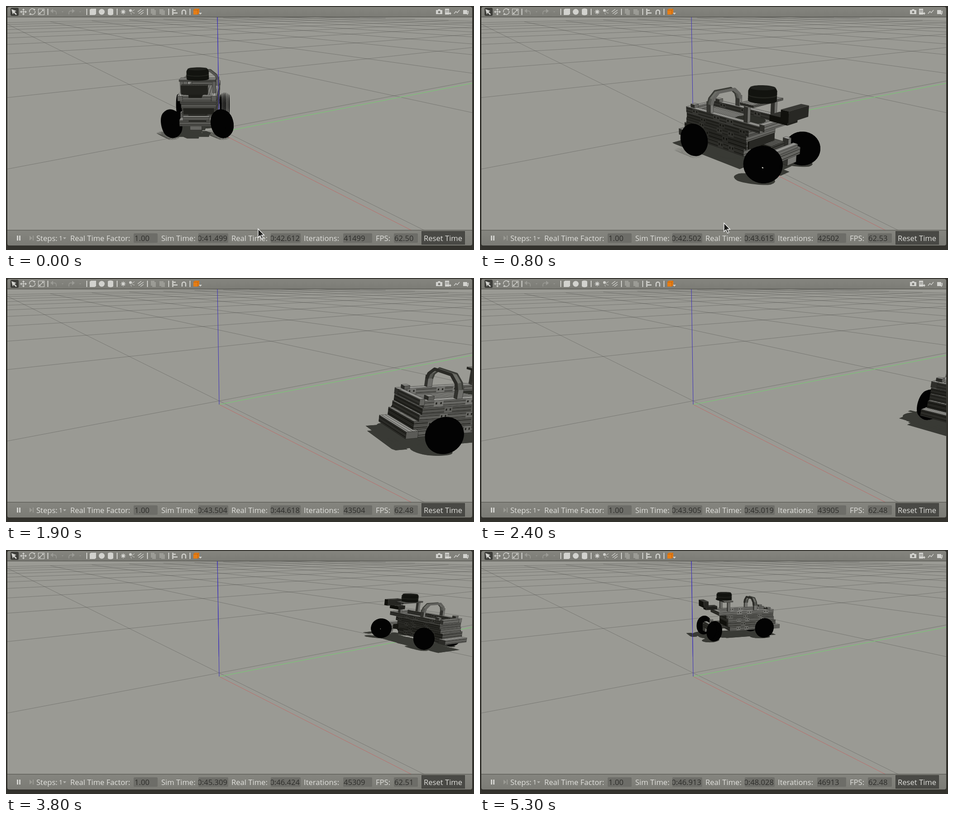
Write an HTML page with a canvas that moves like this. It is 1034 px wide and 542 px high and loops after 5400 ms.

```html
<!DOCTYPE html>
<html lang="en">
<head>
<meta charset="utf-8">
<title>Robot simulation</title>
<style>
html, body { margin: 0; width: 100%; height: 100%; overflow: hidden; background: #33322d; }
canvas { position: absolute; left: 3px; top: 24px; }
svg.ui { position: absolute; left: 0; top: 0; }
text { font: 16.6px "Open Sans", "Noto Sans", sans-serif; fill: #e0e0dc; }
.value { fill: #2d2d2a; }
.field { fill: #6d6d68; }
.icon { fill: none; stroke: #d2d2ce; stroke-width: 1.4; }
.solid { fill: #d2d2ce; }
.dim { opacity: .32; }
</style>
</head>
<body>
<canvas id="view" width="1027" height="474"></canvas>
<svg class="ui" width="1034" height="542">
  <defs>
    <linearGradient id="bar" x2="0" y2="1"><stop stop-color="#85857f"/><stop offset="1" stop-color="#7b7b75"/></linearGradient>
  </defs>
  <path d="M3 24V6q0-4 4-4H1026q4 0 4 4V24z" fill="url(#bar)"/>
  <path d="M3 498H1030V528q0 4-4 4H7q-4 0-4-4z" fill="url(#bar)"/>
  <path d="M3 24.500H1030M3 498H1030" stroke="#484843"/>
  <path d="M92.500 6V20M178.500 6V20M245.500 6V20M312.500 6V20M359.500 6V20M406.500 6V20" stroke="#ecece8" stroke-width="1.500"/>

  <rect x="10" y="4" width="18" height="18" rx="3" fill="#3d3d39"/>
  <path class="solid" d="M12 7l11 4-4 2 5 5-2 2-5-5-2 4z"/>
  <g class="icon">
    <path d="M33 13H44M38.500 7.500V18.500"/>
    <path d="M52 14a6 6 0 0 1 10-6M64 11a6 6 0 0 1-10 6"/>
    <path d="M71.500 6.500H84.500V19.500H71.500zM74 17L82 9" stroke-width="1.200"/>
    <path d="M253 13h12M259 7v12M255 9l8 8M263 9l-8 8" stroke-width="1.100"/>
    <path d="M278 12l6-4M279 14l5 2M276 15l1 4" stroke-width="1.300" stroke-dasharray="2 1"/>
    <path d="M291 13l8-6M293 17l11-8M297 19l7-5"/>
    <path d="M368.500 6V20M370 9.500h5M370 15.500h9" stroke-width="2.600"/>
    <path d="M389 19v-6a4 4 0 0 1 8 0v6" stroke-width="2.400"/>
    <path d="M990 17l4-5 3 3 5-6"/>
  </g>
  <path class="solid" d="M38.500 5.500l3 3.500h-6zM38.500 20.500l3-3.500h-6zM31 13l3.500-3v6zM46 13l-3.500-3v6zM61 6l4 1-3 4zM55 20l-4-1 3-4zM79 8h4v4zM73 14v4h4z"/>
  <g class="dim">
    <path class="icon" d="M101 11h7q4 1 3 8M149 11h-7q-4 1-3 8" stroke-width="2"/>
    <path class="solid" d="M98 11l6-5v10zM152 11l-6-5v10zM123 12h4l-2 2zM162 12h4l-2 2zM320 6h8v11h-8zM323 9h8v11h-8zM339 7h9v11h-9zM343 10h8v10h-8z"/>
  </g>
  <path class="solid" d="M185 8l3-2h11v12l-3 2h-11zM225 8a6 2.500 0 0 1 12 0v10a6 2.500 0 0 1-12 0z"/>
  <g class="solid"><circle cx="211.500" cy="13" r="6.500"/><circle cx="259" cy="13" r="3.200"/><circle cx="275" cy="10" r="3"/></g>
  <path d="M414 9l3-3h10v10l-3 3h-10z" fill="#e57d16"/>
  <path d="M414 9h10v10M424 9l3-3" stroke="#b95f0b" fill="none"/>
  <path class="solid" d="M426 15h7l-3.500 4zM950 9h4l1-2h4l1 2h4v9h-14zM970 6h9v13h-9zM1010 9h9v9h-9zM1019 13l3-3v7z"/>
  <circle cx="957" cy="13.500" r="2.500" fill="#777772"/>
  <path d="M971 10h7M971 13h7" stroke="#6d6d68"/>
  <path class="solid" d="M976 15h5v-2l3 3.500-3 3.500v-2h-5zM1017 16h5l-2.500 4z"/>

  <path class="solid" d="M24 510h3v11h-3zM29 510h3v11h-3z"/>
  <path class="solid dim" d="M52 510l6 5.500-6 5.500zM59 510h2v11h-2z"/>
  <path class="solid" d="M126 514h7l-3.500 4z" opacity=".7"/>
  <g class="field">
    <rect x="282" y="505" width="53" height="21" rx="2"/><rect x="425" y="505" width="66" height="21" rx="2"/>
    <rect x="585" y="505" width="66" height="21" rx="2"/><rect x="745" y="505" width="64" height="21" rx="2"/>
    <rect x="857" y="505" width="53" height="21" rx="2"/>
  </g>
  <rect x="918.500" y="500.500" width="95" height="29" fill="#494945" stroke="#40403c"/>
  <text x="67" y="522">Steps:</text><svg x="118" y="500" width="6" height="30"><text x="-1" y="21" style="font-size:14px">1</text></svg>
  <text x="142" y="522">Real Time Factor:</text><text class="value" x="284" y="522">1.00</text>
  <text x="343" y="522">Sim Time:</text>
  <svg x="425" y="500" width="66" height="30"><text class="value" id="sim" x="64" y="22" text-anchor="end"></text></svg>
  <text x="498" y="522">Real Time:</text>
  <svg x="585" y="500" width="66" height="30"><text class="value" id="real" x="64" y="22" text-anchor="end"></text></svg>
  <text x="658" y="522">Iterations:</text><text class="value" id="steps" x="746" y="522"></text>
  <text x="817" y="522">FPS:</text><text class="value" id="fps" x="858" y="522"></text>
  <text x="923" y="522">Reset Time</text>
  <path id="cursor" d="M0 0V19L4.500 15L8 22.500L11 21L7.500 14H13.500z" fill="#1c1c1a" stroke="#fff" stroke-width="1.300"/>
</svg>
<script>
const $ = id => document.getElementById(id);
const ctx = $('view').getContext('2d');
const RAD = Math.PI / 180, LOOP = 5400, FOCAL = 889;
const EYE = .454, GRID_Z = .014, PITCH = Math.atan(267 / FOCAL);
const S = Math.sin(PITCH), C = Math.cos(PITCH);
const SLANT = [.42, -.38];                 // shadow shift per unit of height
const SUN = [-.365, .33, .868];
const STEER = -38 * RAD;

// Ground coordinates: [forward from the camera, right, up].
const depth = p => p[0] * C + (EYE - p[2]) * S;
const project = p => {
  const k = FOCAL / depth(p);
  return [517 + k * p[1], 261 + k * ((EYE - p[2]) * C - p[0] * S)];
};
const mix = (a, b, k) => a.map((v, i) => v + (b[i] - v) * k);
const lerp = (xs, ys, x) => {
  let i = 0;
  while (i < xs.length - 2 && x >= xs[i + 1]) i++;
  return ys[i] + (ys[i + 1] - ys[i]) * (x - xs[i]) / (xs[i + 1] - xs[i]);
};

function trace(points) {
  ctx.beginPath();
  points.forEach(p => ctx.lineTo(...project(p)));
}
function fill(points, color) {
  trace(points);
  ctx.closePath();
  ctx.fillStyle = color;
  ctx.fill();
}
function line(points, color, width = 1) {
  trace(points);
  ctx.strokeStyle = color;
  ctx.lineWidth = width;
  ctx.stroke();
}
function ray(a, b, color, width) {
  const near = .05, da = depth(a), db = depth(b);
  if (da < near && db < near) return;
  if (da < near) a = mix(a, b, (near - da) / (db - da));
  if (db < near) b = mix(b, a, (near - db) / (da - db));
  line([a, b], color, width);
}

const YAW = 33.2 * RAD;
const onFloor = (x, y, z) => [
  1.3963 - x * Math.cos(YAW) + y * Math.sin(YAW),
  -.0758 + x * Math.sin(YAW) + y * Math.cos(YAW), z];

function drawFloor() {
  ctx.fillStyle = '#9a9a94';
  ctx.fillRect(0, 0, 1034, 542);
  for (let i = -10; i <= 10; i++) {
    ray(onFloor(i, -10, GRID_Z), onFloor(i, 10, GRID_Z), 'rgba(60,60,56,.45)', .8);
    ray(onFloor(-10, i, GRID_Z), onFloor(10, i, GRID_Z), 'rgba(60,60,56,.45)', .8);
  }
  const o = onFloor(0, 0, 0);
  ray(o, onFloor(10, 0, 0), '#c4605f', .8);
  ray(o, onFloor(0, 10, 0), '#74d070', 1);
  drawMast(0);
}
const drawMast = z => ray(onFloor(0, 0, z), onFloor(0, 0, .6), '#3a2ebb', 1);

// Robot boxes in its own axes: x forward, y right, z up.
const parts = [];
const box = (x0, x1, y0, y1, z0, z1, tone = 1) => parts.push({ lo: [x0, y0, z0], hi: [x1, y1, z1], tone });
const wide = (x0, x1, half, z0, z1, tone) => box(x0, x1, -half, half, z0, z1, tone);
const pair = (x0, x1, y0, y1, z0, z1, tone) => {
  box(x0, x1, y0, y1, z0, z1, tone);
  box(x0, x1, -y1, -y0, z0, z1, tone);
};
wide(-.235, -.2, .068, .04, .06);
wide(-.2, .045, .062, .04, .062);
wide(-.212, .055, .062, .062, .085, .85);
wide(.055, .06, .056, .063, .104, .4);
wide(-.2, .055, .064, .085, .104);
wide(.045, .115, .03, .05, .08, .6);
wide(.115, .15, .058, .045, .066);
pair(.1, .118, .044, .058, .036, .085, 1.1);
wide(.135, .15, .045, .066, .078, 1.1);
wide(.15, .165, .02, .036, .076, 1.2);
wide(-.195, .065, .066, .104, .122, .9);
wide(-.19, .1, .052, .122, .128, .85);
pair(-.195, .106, .05, .068, .124, .142, 1.1);
wide(.09, .106, .05, .124, .142, 1.1);
wide(-.195, -.18, .05, .124, .142, 1.1);
pair(-.18, -.163, .045, .062, .142, .152);
pair(-.1, -.084, .056, .068, .142, .175, 1.2);
pair(.045, .058, .052, .064, .142, .186, 1.1);
wide(.1, .16, .022, .148, .166, .35);
wide(.153, .178, .044, .163, .194, .4);
wide(.03, .078, .064, .188, .194, .9);

const wheels = [-1, 1].flatMap(side => [-.137, .137].map(x => ({ x, side })));
const circle = Array.from({ length: 36 }, (_, i) => [Math.cos(i * 10 * RAD), Math.sin(i * 10 * RAD)]);
const tire = [-.019, -.016, -.011, -.005, 0, .005, .011, .016, .019];
const grey = g => `rgb(${g | 0},${g | 0},${(g - 4) | 0})`;

function drawRobot(phi) {
  const cF = 1.615 + .577 * Math.cos(phi), cR = .41 + .577 * Math.sin(phi);
  const theta = phi - 76.4 * RAD, hx = Math.cos(theta), hy = Math.sin(theta);
  const turn = (x, y) => [x * hx - y * hy, x * hy + y * hx];
  const place = ([x, y, z]) => {
    const [f, r] = turn(x, y);
    return [cF + f, cR + r, z];
  };
  const eye = [-cF * hx - cR * hy, cF * hy - cR * hx, EYE];
  const shade = (p, z = 0) => [p[0] + SLANT[0] * (p[2] - z), p[1] + SLANT[1] * (p[2] - z), z];
  const dist = p => Math.hypot(...p.map((v, i) => v - eye[i]));
  const middle = b => mix(b.lo, b.hi, .5);
  const light = ([x, y, z]) => {
    const lit = [...turn(x, y), z].reduce((s, v, i) => s + v * SUN[i], 0);
    return 42 + 118 * Math.max(0, lit);
  };

  const faces = b => [0, 1, 2].flatMap(axis => [0, 1].map(end => {
    const [u, v] = [0, 1, 2].filter(i => i !== axis);
    const corner = (a, c) => {
      const p = [];
      p[axis] = end ? b.hi[axis] : b.lo[axis];
      p[u] = a ? b.hi[u] : b.lo[u];
      p[v] = c ? b.hi[v] : b.lo[v];
      return p;
    };
    return { axis, end, quad: [corner(0, 0), corner(1, 0), corner(1, 1), corner(0, 1)] };
  }));

  // Part of a quad, in fractions along its two edges.
  const patch = ([a, b, c, d], u0, u1, v0, v1) => {
    const at = (u, v) => mix(mix(a, b, u), mix(d, c, u), v);
    return [at(u0, v0), at(u1, v0), at(u1, v1), at(u0, v1)];
  };

  function drawBox(b) {
    for (const { axis, end, quad } of faces(b)) {
      if (end ? eye[axis] < b.hi[axis] : eye[axis] > b.lo[axis]) continue;
      const normal = [0, 0, 0];
      normal[axis] = end ? 1 : -1;
      const g = light(normal) * b.tone;
      const q = quad.map(place), px = FOCAL / depth(q[0]);
      fill(q, grey(g));
      if (b.tone < .5) continue;
      line([...q, q[0]], 'rgba(25,25,22,.5)', .0012 * px);
      const size = b.hi.map((v, i) => i === axis ? 0 : v - b.lo[i]);
      const length = Math.max(...size);
      if (length < .05) continue;
      const first = [0, 1, 2].find(i => i !== axis) === size.indexOf(length);
      const sheet = first ? q : [q[1], q[2], q[3], q[0]];
      const rows = Math.max(2, Math.round(Math.min(...size.filter(Boolean)) / .01));
      for (let i = 0; i < rows; i++) {
        const v = (i + .5) / rows, h = .12 / rows;
        fill(patch(sheet, 0, 1, v - h, v + h), grey(g * .5));
        fill(patch(sheet, 0, 1, v + h, v + 2 * h), grey(g * 1.2));
      }
      if (axis !== 1 || length < .2) continue;
      // Bolted joining plates.
      for (let i = 0; i < 3; i++) {
        const u = .08 + (i * .31 + b.lo[2] * 17) % .8;
        fill(patch(sheet, u, u + .09, .05, 1), grey(g * 1.15));
        fill(patch(sheet, u + .015, u + .03, .4, .7), grey(g * .35));
        fill(patch(sheet, u + .06, u + .075, .4, .7), grey(g * .35));
      }
    }
  }

  function tireRings({ x, side }) {
    const a = x > 0 ? STEER : 0, ca = Math.cos(a), sa = Math.sin(a);
    return tire.map(o => {
      const r = .051 - 24 * o * o;
      return circle.map(([c, s]) => place([x + r * c * ca - o * sa, side * .088 + r * c * sa + o * ca, .05 + r * s]));
    });
  }
  function drawWheel(w) {
    tireRings(w).forEach(r => fill(r, '#030303'));
    if (w.x < 0) return;
    const n = [-Math.sin(STEER) * w.side, Math.cos(STEER) * w.side];
    const hub = [w.x + n[0] * .02, w.side * .088 + n[1] * .02, .05];
    const facing = (n[0] * (eye[0] - hub[0]) + n[1] * (eye[1] - hub[1])) / dist(hub);
    if (facing < .87) return;
    fill(circle.map(([c, s]) => place([hub[0] + .0025 * c, hub[1], .05 + .0018 * s])), '#c8c8c0');
  }

  const archLine = [[-.062, .165], [-.056, .182], [-.034, .2], [.034, .2], [.056, .182], [.062, .165]];
  const archAt = x => archLine.map(([y, z]) => place([x, y, z]));
  function drawArch() {
    const fromFront = eye[0] > -.09;
    const [far, near] = (fromFront ? [-.1, -.084] : [-.084, -.1]).map(archAt);
    const width = .009 * FOCAL / depth(near[2]);
    ctx.lineJoin = 'round';
    line(far, '#3a3b36', width);
    for (let i = 0; i < 5; i++) fill([far[i], far[i + 1], near[i + 1], near[i]], i % 4 ? '#6c6d67' : '#53544f');
    line(near, grey(light([fromFront ? 1 : -1, 0, 0])), width);
  }

  const lidar = Array.from({ length: 13 }, (_, i) => {
    const z = .194 + i * .003, r = z > .222 ? .04 - (z - .222) * .6 : .04;
    return circle.map(([c, s]) => place([.055 + r * c, r * s, z]));
  });
  const shadow = '#393a35';
  for (const b of parts) for (const f of faces(b)) fill(f.quad.map(p => shade(place(p))), shadow);
  for (const w of wheels) for (const r of tireRings(w)) fill(r.map(p => shade(p)), shadow);
  for (const r of lidar) fill(r.map(p => shade(p)), shadow);

  const byDistance = (a, b) => dist([b.x, b.side * .088, .05]) - dist([a.x, a.side * .088, .05]);
  const order = (a, b) => a.lo[2] - b.lo[2] || dist(middle(b)) - dist(middle(a));
  const isNear = w => w.side * eye[1] > .07;
  const sorted = [...wheels].sort(byDistance), stack = [...parts].sort(order);
  const layers = (from, to) => stack.filter(b => b.lo[2] >= from && b.lo[2] < to).forEach(drawBox);

  sorted.filter(w => !isNear(w)).forEach(drawWheel);
  layers(0, .1);
  sorted.filter(isNear).forEach(drawWheel);
  layers(.1, .123);

  // Lidar shade falling on the deck.
  ctx.save();
  trace([[-.19, -.05, .128], [.1, -.05, .128], [.1, .05, .128], [-.19, .05, .128]].map(place));
  ctx.clip();
  lidar.forEach(r => fill(r.map(p => shade(p, .128)), '#2f302b'));
  ctx.restore();

  layers(.123, .145);
  drawArch();
  layers(.145, 1);
  lidar.forEach((r, i) => fill(r, i === 12 ? '#20211d' : i === 5 ? '#23241f' : '#12130f'));

  // The vertical axis stands in front of the body on the far part of the circle.
  if (cF > 1.4) {
    drawMast(.075);
    if (cR < 0) drawWheel({ x: .137, side: -1 });
  }
}

const times = [0, 800, 1300, 1900, 3000, 4500, 5300];
const angles = [-103.6, -147.1, -174.3, -204.8, -263, -346.5, -392];
const ticks = [0, 5, 7, 10, 15, 23, 27];
const simTimes = [41.499, 42.502, 42.902, 43.504, 44.506, 46.112, 46.913];
const realTimes = [42.612, 43.615, 44.015, 44.618, 45.621, 47.227, 48.028];
const rates = [62.5, 62.53, 62.48, 62.48, 62.49, 62.53, 62.48];

function drawStatus(t) {
  const tick = Math.floor(lerp(times, ticks, t) + 1e-6);
  const sim = lerp(ticks, simTimes, tick);
  $('sim').textContent = '0:' + sim.toFixed(3);
  $('real').textContent = '0:' + lerp(ticks, realTimes, tick).toFixed(3);
  $('steps').textContent = Math.round(sim * 1000);
  $('fps').textContent = lerp(ticks, rates, tick).toFixed(2);
}

function drawCursor(t) {
  const k = Math.min(1, t / 800);
  const [x, y] = t < 1300 ? [557 - 18 * k, 495 - 13 * k] : t < 1400 ? [67, 104] : [37, 77];
  $('cursor').setAttribute('transform', `translate(${x} ${y})`);
  $('cursor').style.display = t < 1500 ? '' : 'none';
}

function frame(now) {
  const t = Math.floor(now % LOOP / 100) * 100;
  ctx.setTransform(1, 0, 0, 1, -3, -24);
  drawFloor();
  drawRobot(lerp(times, angles, t) * RAD);
  drawStatus(t);
  drawCursor(t);
  requestAnimationFrame(frame);
}
requestAnimationFrame(frame);
</script>
</body>
</html>
```
